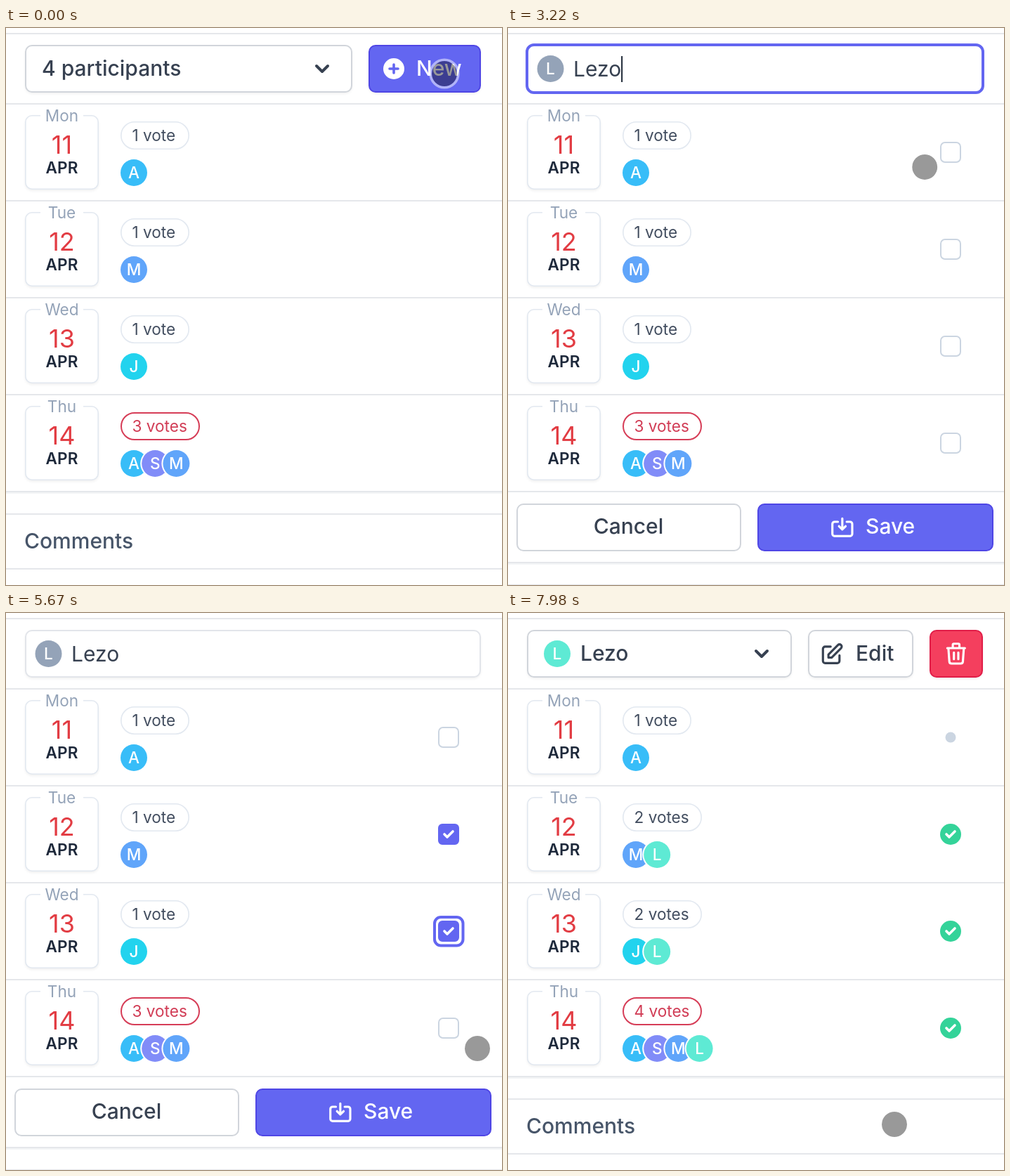
Write an HTML page with a canvas that moves like this. It is 706 by 793 pixels and loops after 8000 ms.

```html
<!DOCTYPE html>
<html lang="en">
<head>
<meta charset="utf-8">
<title>Poll voting</title>
<style>
html, body { margin: 0; width: 100%; height: 100%; overflow: hidden; background: #fff; }
canvas { display: block; width: 706px; height: 793px; }
</style>
</head>
<body>
<canvas id="stage" width="706" height="793"></canvas>
<script>
const ctx = document.getElementById('stage').getContext('2d');
const LOOP = 8000, NAME = 'Lezo';
const OPEN_AT = 350, SAVED_AT = 7280;
const TYPE_AT = [1890, 2310, 2450, 2590];
const CHECK_AT = [Infinity, 4060, 5110, 6090];
const HIDE_CURSOR = [1890, 3080];

const INDIGO = '#6366f1', INDIGO_EDGE = '#4f46e5', ROSE = '#f43f5e', GREEN = '#34d399';
const INK = '#374151', LINE = '#e5e7eb', EDGE = '#d1d5db', SLATE = '#94a3b8';
const AVATAR = { A: '#38bdf8', M: '#60a5fa', J: '#22d3ee', S: '#818cf8', L: '#5eead4' };

const ROWS = [
  { day: 'Mon', date: '11', voters: 'A' },
  { day: 'Tue', date: '12', voters: 'M' },
  { day: 'Wed', date: '13', voters: 'J' },
  { day: 'Thu', date: '14', voters: 'ASM' }
];

const ICONS = {
  save: 'M8 7H5a2 2 0 00-2 2v9a2 2 0 002 2h14a2 2 0 002-2V9a2 2 0 00-2-2h-3m-1 4l-3 3m0 0l-3-3m3 3V4',
  edit: 'M11 5H6a2 2 0 00-2 2v11a2 2 0 002 2h11a2 2 0 002-2v-5m-1.414-9.414a2 2 0 112.828 2.828L11.828 15H9v-2.828l8.586-8.586z',
  trash: 'M19 7l-.867 12.142A2 2 0 0116.138 21H7.862a2 2 0 01-1.995-1.858L5 7m5 4v6m4-6v6m1-10V4a1 1 0 00-1-1h-4a1 1 0 00-1 1v3M4 7h16'
};

// Pointer stops: time, x, y
const PATH = [
  [0, 624, 65], [700, 624, 65], [1400, 590, 180], [3080, 590, 180],
  [3710, 615, 320], [3920, 629, 319], [4340, 629, 319], [4830, 646, 439],
  [5040, 636, 452], [5250, 636, 452], [5670, 671, 620], [5880, 634, 598],
  [6160, 634, 598], [6720, 550, 728], [LOOP, 550, 728]
];

function text(str, x, y, size, weight, color, align = 'left') {
  ctx.font = `${weight} ${size}px Inter, sans-serif`;
  ctx.textAlign = align;
  ctx.fillStyle = color;
  ctx.fillText(str, x, y);
}

function circle(x, y, r, color) {
  ctx.beginPath();
  ctx.arc(x, y, r, 0, Math.PI * 2);
  ctx.fillStyle = color;
  ctx.fill();
}

// Rounded box whose border lies inside the given outer bounds
function box(x, y, w, h, r, fill, edge, width = 2, shadow = false) {
  const half = width / 2;
  ctx.beginPath();
  ctx.roundRect(x + half, y + half, w - width, h - width, r - half);
  ctx.save();
  if (shadow) {
    ctx.shadowColor = 'rgba(0,0,0,0.08)';
    ctx.shadowBlur = 4;
    ctx.shadowOffsetY = 2;
  }
  ctx.fillStyle = fill;
  ctx.fill();
  ctx.restore();
  ctx.strokeStyle = edge;
  ctx.lineWidth = width;
  ctx.stroke();
}

function stroke(points, color, width) {
  ctx.beginPath();
  points.forEach(([x, y], i) => i ? ctx.lineTo(x, y) : ctx.moveTo(x, y));
  ctx.strokeStyle = color;
  ctx.lineWidth = width;
  ctx.lineCap = ctx.lineJoin = 'round';
  ctx.stroke();
}

function icon(name, x, y, color) {
  ctx.save();
  ctx.translate(x, y);
  ctx.scale(1.57, 1.57);
  ctx.lineWidth = 2;
  ctx.lineCap = ctx.lineJoin = 'round';
  ctx.strokeStyle = color;
  ctx.stroke(new Path2D(ICONS[name]));
  ctx.restore();
}

function rule(y) {
  ctx.fillStyle = LINE;
  ctx.fillRect(0, y, 706, 2);
}

function softEdge(y) {
  rule(y);
  ctx.fillStyle = '#f3f4f6';
  ctx.fillRect(0, y + 2, 706, 2);
}

function avatar(letter, x, y, color) {
  circle(x, y, 19, color);
  text(letter, x, y + 8, 22.6, 500, '#fff', 'center');
}

function chevron(x) {
  stroke([[x - 8, 54], [x, 62], [x + 8, 54]], INK, 4);
}

function tick(x, y) {
  stroke([[x - 6, y], [x - 2, y + 4], [x + 6, y - 4]], '#fff', 3.6);
}

function drawRow(row, i, saved) {
  const y = 138 * i;
  box(27, y + 124, 105, 106, 10, '#fff', '#e2e8f0', 1.6, true);
  ctx.fillStyle = '#fff';
  ctx.fillRect(49, y + 121, 61, 8);
  text(row.day, 79.5, y + 133, 22.6, 400, SLATE, 'center');
  text(row.date, 79.5, y + 179, 36, 400, '#e23c43', 'center');
  text('APR', 79.5, y + 207, 22.6, 600, '#1e293b', 'center');

  const voters = row.voters + (saved && i ? 'L' : '');
  const count = voters.length, top = i === 3;
  box(163, y + 133, count > 1 ? 113 : 98, 40, 20, '#fff',
    top ? '#d63d57' : '#e2e8f0', top ? 2 : 1.6);
  text(`${count} vote${count > 1 ? 's' : ''}`, 179.5, y + 161, 22.6, 400,
    top ? '#d13c55' : '#424d5f');

  [...voters].forEach((v, k) => {
    const x = 182 + 30.2 * k;
    if (k) circle(x, y + 206, 21, '#fff');
    avatar(v, x, y + 206, AVATAR[v]);
  });
}

function drawCheckbox(i, t) {
  const x = 630, y = 177 + 138 * i;
  if (t < CHECK_AT[i]) {
    box(x - 15, y - 15, 30, 30, 7, '#fff', '#cbd5e1');
    return;
  }
  const focused = !(t >= CHECK_AT[i + 1]);
  if (focused) box(x - 22, y - 22, 44.5, 44.5, 11, '#fff', INDIGO, 4);
  box(x - 15, y - 15, 30, 30, 6, INDIGO, INDIGO);
  tick(x, y);
}

function drawResult(i) {
  const y = 177 + 138 * i;
  if (!i) return circle(630, y, 7.5, '#cbd5e1');
  circle(630, y, 15, GREEN);
  tick(630, y);
}

function drawOverviewHeader() {
  box(27, 24, 466, 68, 10, '#fff', EDGE, 2, true);
  text('4 participants', 51, 68, 30, 500, INK);
  chevron(450);
  box(516, 24, 160, 68, 10, INDIGO, INDIGO_EDGE, 2, true);
  circle(552, 58, 15, '#fff');
  stroke([[546, 58], [558, 58]], INDIGO, 3.6);
  stroke([[552, 52], [552, 64]], INDIGO, 3.6);
  text('New', 584, 68, 30, 500, '#fff');
}

function drawSavedHeader() {
  box(27, 24, 377, 68, 10, '#fff', EDGE, 2, true);
  avatar('L', 70, 58, AVATAR.L);
  text(NAME, 103, 68, 30, 500, INK);
  chevron(361);
  box(427, 24, 150, 68, 10, '#fff', EDGE, 2, true);
  icon('edit', 442, 40, INK);
  text('Edit', 495, 68, 30, 500, INK);
  box(600, 24, 76, 68, 10, ROSE, '#e11d48', 2, true);
  icon('trash', 619, 39, '#fff');
}

function drawNameInput(t) {
  const typed = NAME.slice(0, TYPE_AT.filter(at => t >= at).length);
  const focused = t < CHECK_AT[1];
  if (focused) box(25, 22, 653, 72, 12, '#fff', INDIGO, 4);
  else box(27, 24, 649, 68, 10, '#fff', '#e2e5ea', 2, true);
  avatar(typed[0] || '', 60.5, 58, SLATE);
  text(typed, 93, 69, 30, 400, INK);
  if (focused) {
    ctx.fillStyle = '#1f2937';
    ctx.fillRect(93 + ctx.measureText(typed).width, 40, 2, 37);
  }
}

function drawFormFooter() {
  rule(659);
  box(12, 677, 320, 68, 10, '#fff', EDGE);
  text('Cancel', 171.5, 720, 30, 500, INK, 'center');
  box(355, 677, 336, 68, 10, INDIGO, INDIGO_EDGE);
  icon('save', 457, 692, '#fff');
  text('Save', 509, 720, 30, 500, '#fff');
  softEdge(760);
  rule(792);
}

function drawComments() {
  softEdge(659);
  rule(691);
  text('Comments', 26, 741, 30, 500, '#475569');
  rule(769);
}

function drawCursor(t) {
  if (t >= HIDE_CURSOR[0] && t < HIDE_CURSOR[1]) return;
  const next = PATH.findIndex(p => p[0] > t);
  const [t0, x0, y0] = PATH[next - 1], [t1, x1, y1] = PATH[next];
  const u = (t - t0) / (t1 - t0), ease = u * u * (3 - 2 * u);
  const x = x0 + (x1 - x0) * ease, y = y0 + (y1 - y0) * ease;
  circle(x, y, 18, 'rgba(0,0,0,0.4)');
  ctx.beginPath();
  ctx.arc(x, y, 19.8, 0, Math.PI * 2);
  ctx.strokeStyle = 'rgba(255,255,255,0.5)';
  ctx.lineWidth = 3.6;
  ctx.stroke();
}

function draw(t) {
  const saved = t >= SAVED_AT, editing = t >= OPEN_AT && !saved;
  ctx.fillStyle = '#fff';
  ctx.fillRect(0, 0, 706, 793);
  [7, 107, 245, 383, 521].forEach(rule);

  if (editing) drawNameInput(t);
  else if (saved) drawSavedHeader();
  else drawOverviewHeader();

  ROWS.forEach((row, i) => {
    drawRow(row, i, saved);
    if (editing) drawCheckbox(i, t);
    if (saved) drawResult(i);
  });

  if (editing) drawFormFooter();
  else drawComments();
  drawCursor(t);
}

const start = performance.now();
function frame() {
  draw((performance.now() - start) % LOOP);
  requestAnimationFrame(frame);
}
frame();
</script>
</body>
</html>
```
